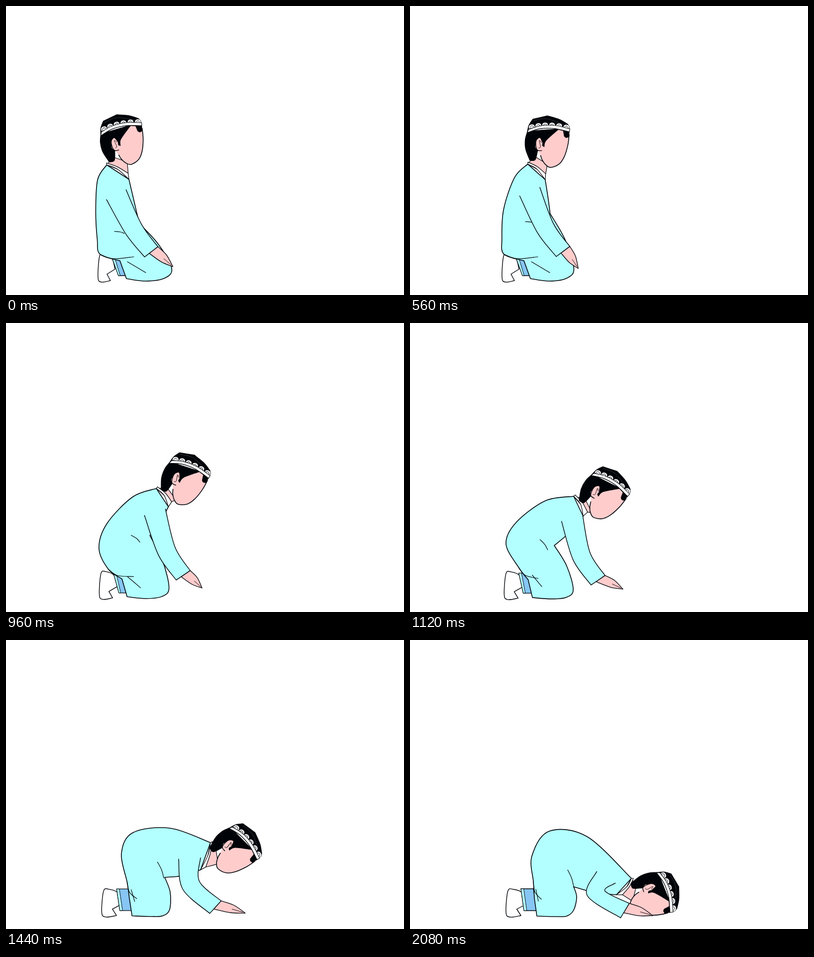
Animation of 800 by 582 pixels, one loop 3230 ms. Source, as an HTML page with a canvas:

```html
<!DOCTYPE html>
<html lang="en">
<head>
<meta charset="utf-8">
<title>Bowing down</title>
<style>
html, body { margin: 0; width: 100%; height: 100%; overflow: hidden; background: #fff; }
canvas { display: block; width: 800px; height: 582px; }
</style>
</head>
<body>
<canvas id="stage" width="800" height="582"></canvas>
<script>
const ctx = document.getElementById('stage').getContext('2d');
const LOOP = 3230, HOLD = 400, STEP = 80, LAST = 22;
const INK = '#000409', ROBE = '#b3ffff', SKIN = '#ffcccc', BLUE = '#86c5f4', WHITE = '#fff';

const pairs = a => a.flatMap((v, i) => i % 2 ? [] : [[v, a[i + 1]]]);
const add = ([x, y], dx, dy) => [x + dx, y + dy];
const mix = (a, b, u) => a.map((v, i) => v + (b[i] - v) * u);
const along = (a, b) => {
  const d = Math.hypot(b[0] - a[0], b[1] - a[1]);
  return [(b[0] - a[0]) / d, (b[1] - a[1]) / d];
};
const shift = (p, dir, d) => add(p, dir[0] * d, dir[1] * d);
const smooth = (a, b, k) => {
  const u = Math.min(1, Math.max(0, (k - a) / (b - a)));
  return u * u * (3 - 2 * u);
};

// Path of each joint through the key poses.
const keys = [0, 1, 5, 10, 14, 18, LAST];
const joints = {
  nape:     [207,320, 267,320, 329,349, 411,408, 437,444, 445,480],
  spine:    [188,350, 232,343, 272,358, 330,379, 345,381, 356,396],
  loin:     [183,415, 194,405, 213,402, 255,388, 270,387, 280,385],
  hip:      [185,470, 185,465, 193,445, 232,430, 239,435, 245,435],
  waist:    [270,438, 291,406, 290,448, 319,478, 324,485, 329,497],
  chest:    [251,349, 294,354, 348,389, 391,463, 400,489, 415,513],
  shoulder: [225,380, 260,371, 326,394, 369,440, 383,460, 394,478],
  elbow:    [259,450, 289,448, 345,470, 372,494, 373,499, 374,510],
  wrist:    [293,495, 325,496, 378,518, 421,538, 428,536, 432,545],
  tip:      [336,525, 348,532, 428,536, 481,550, 486,552, 488,555],
  ear:      [223,278, 295,283, 372,338, 446,411, 471,447, 481,497]
};
const turns = [0, 3.5, 21.5, 43.5, 62, 67, 85];

// The resting pose is the first one leaning slightly back.
const paths = Object.entries(joints).map(([name, list]) => {
  const pts = pairs(list), [x, y] = pts[0];
  return [name, [[x - 4.5 * (550 - y) / 230, y], ...pts]];
});

// Hermite blend of key values at step k.
function blend(vals, k) {
  let i = 0;
  while (i < keys.length - 2 && k >= keys[i + 1]) i++;
  const span = keys[i + 1] - keys[i], u = (k - keys[i]) / span, v = 1 - u;
  const slope = j => {
    const a = Math.max(0, j - 1), b = Math.min(keys.length - 1, j + 1);
    return (vals[b] - vals[a]) / (keys[b] - keys[a]) * span;
  };
  return vals[i] + (vals[i + 1] - vals[i]) * u * u * (3 - 2 * u)
    + slope(i) * u * v * v - slope(i + 1) * u * u * v;
}

// Smooth curve through the points; listed corners stay sharp.
function curve(pts, { fill, line = INK, width = 1.4, open = false, corners = [] } = {}) {
  const n = pts.length;
  const p = i => pts[open ? Math.min(n - 1, Math.max(0, i)) : (i + n) % n];
  const sharp = i => corners === 'all' || corners.includes(i % n);
  ctx.beginPath();
  ctx.moveTo(...p(0));
  for (let i = 0; i < (open ? n - 1 : n); i++) {
    const a = p(i), b = p(i + 1);
    const before = sharp(i) ? a : p(i - 1), after = sharp(i + 1) ? b : p(i + 2);
    ctx.bezierCurveTo(
      a[0] + (b[0] - before[0]) / 6, a[1] + (b[1] - before[1]) / 6,
      b[0] - (after[0] - a[0]) / 6, b[1] - (after[1] - a[1]) / 6, ...b);
  }
  if (fill) { ctx.fillStyle = fill; ctx.fill(); }
  if (line) { ctx.strokeStyle = line; ctx.lineWidth = width; ctx.stroke(); }
}
const shape = (list, style) => curve(pairs(list), style);

function drawCap() {
  shape([190,262, 190,246, 195,232, 222,219, 247,221, 266,227, 272,242, 240,241, 212,248],
    { fill: INK, corners: [0, 2, 3, 5, 6] });
  shape([198,234, 224,225, 266,231], { open: true, line: '#4a4f55', width: 0.6 });
  for (let i = 0; i < 6; i++) {
    const u = (i + 0.5) / 6, v = 1 - u;
    ctx.save();
    ctx.translate(v * v * 191 + 2 * u * v * 226 + u * u * 272, v * v * 252 + 2 * u * v * 233 + u * u * 235);
    ctx.rotate(0.04 - 0.5 * v);
    shape([-7,1, -5,-5, 0,-7, 5,-5, 7,1], { fill: WHITE, width: 0.8, corners: [0, 4] });
    shape([-4,-1, 0,-4, 4,-1], { open: true, width: 0.9 });
    ctx.restore();
  }
  shape([190,261, 212,248, 240,241, 272,241, 272,235, 240,235, 212,242, 191,254],
    { fill: WHITE, width: 1, corners: [0, 3, 4, 7] });
}

// Head in upright coordinates, turned about the ear.
const PIVOT = [217, 278];
function drawHead(ear, turn) {
  ctx.save();
  ctx.translate(...ear);
  ctx.rotate(turn);
  ctx.translate(-PIVOT[0], -PIVOT[1]);
  const jaw = pairs([273,246, 275,268, 273,292, 266,309, 251,319, 240,316, 231,308, 226,300]);
  curve([...jaw, [218, 290], [222, 262], [245, 240]], { fill: SKIN, line: null, corners: [0, 8] });
  curve(jaw, { open: true, width: 1.6 });
  shape([190,258, 189,275, 194,294, 207,314, 217,311, 218,292, 211,284, 216,265,
    224,279, 229,281, 230,268, 250,240], { fill: INK, corners: [0, 3, 5, 8, 9, 11] });
  shape([259,240, 264,252, 268,254, 273,252, 272,238], { fill: INK, width: 0.5, corners: [0, 1, 3, 4] });
  shape([224,273, 217,265, 211,272, 213,284, 218,291, 226,290], { fill: SKIN, open: true });
  shape([222,274, 217,271, 222,283, 219,286], { open: true, width: 0.9 });
  drawCap();
  ctx.restore();
}

function drawLeg(s, hem) {
  const foot = pairs([188,504, 197,500, 213,508, 219,530, 203,540, 210,553, 192,556, 185,547]);
  curve(foot.map(([x, y]) => [185 + (x - 185) * (1 + 0.2 * s) + 8 * s, y + 2 * s]),
    { fill: WHITE, corners: [3, 4, 5] });
  const top = [213 + 10 * s, 507 - 6 * s], low = [226 + 3 * s, 543 + 2 * s];
  const topEnd = add(top, 25, 0), lowEnd = [hem[0], low[1]];
  curve([top, topEnd, lowEnd, low], { fill: BLUE, corners: 'all' });
  curve([top, mix(top, topEnd, 0.22), mix(low, lowEnd, 0.22), low], { fill: ROBE, width: 1, corners: 'all' });
}

function drawRobe(j, s, k, hem) {
  const seat = add(hem, -53 + 46 * s, -49 - 20 * s);
  const back = add(hem, -13 + 8 * s, -36);
  const knee = [333 - 6 * Math.min(1, k / 5) + 2 * s, 528 + 16 * s];
  const thigh = add(mix(j.waist, knee, 0.5), 6, -3);
  const belly = add(mix(j.waist, j.chest, 0.5), 1, 4);
  curve([j.nape, j.spine, j.loin, j.hip, seat, back, hem, add(hem, 38, 5 - 4 * s),
    add(knee, -14, 20 - 8 * s), knee, thigh, j.waist, belly, j.chest],
    { fill: ROBE, width: 1.6, corners: [0, 5, 6, 11, 13] });

  const crease = add(j.waist, -30 * (1 - s), 20 * (1 - s));
  const folds = [
    [seat, add(mix(seat, back, 0.6), 2, 1), add(back, 28 - 14 * s, 10 * s - 8)],
    [add(back, 15 - 12 * s, 2 - 20 * s), add(back, 52 - 44 * s, 24 - 18 * s)],
    [add(crease, 8 * s - 20, -4 - 30 * s), add(crease, 4 * s - 8, -3 - 14 * s), crease]
  ];
  for (const f of folds) curve(f, { open: true, width: 1.2 });
}

function drawArm({ shoulder, elbow, wrist, tip }) {
  const upper = along(shoulder, elbow), lower = along(elbow, wrist);
  const bend = along([0, 0], add(upper, ...lower));
  const sides = (p, [x, y], w) => [shift(p, [-y, x], w), shift(p, [y, -x], w)];
  const [s0, s1] = sides(shoulder, upper, 22);
  const [e0, e1] = sides(elbow, bend, 18.5);
  const [w0, w1] = sides(wrist, lower, 17);

  // Hand tapers from the cuff to the fingertip.
  const root = mix(w0, w1, 0.35), reach = along(wrist, tip), out = [reach[1], -reach[0]];
  const top = mix(w1, tip, 0.5), low = mix(root, tip, 0.55);
  curve([w1, shift(top, out, 4), tip, shift(low, out, -3), root],
    { fill: SKIN, corners: [0, 2, 4], width: 1.3 });
  curve([mix(top, low, 0.5), mix(mix(top, low, 0.4), tip, 0.8)], { open: true, width: 1 });
  curve([s0, e0, w0, w1, e1, s1], { fill: ROBE, open: true, corners: [2, 3] });
}

function draw(k) {
  ctx.fillStyle = WHITE;
  ctx.fillRect(0, 0, 800, 582);
  ctx.lineJoin = ctx.lineCap = 'round';

  const j = Object.fromEntries(paths.map(([name, pts]) =>
    [name, [0, 1].map(axis => blend(pts.map(p => p[axis]), k))]));
  const turn = blend(turns, k) * Math.PI / 180;
  const onHead = (x, y) => {
    const dx = x - PIVOT[0], dy = y - PIVOT[1], c = Math.cos(turn), n = Math.sin(turn);
    return add(j.ear, dx * c - dy * n, dx * n + dy * c);
  };
  const s = smooth(3, 16, k);
  const hem = [242 + 13 * s * s, 549 + 7 * s];

  const mid = mix(j.nape, j.chest, 0.5), up = along(mid, j.ear);
  const throat = shift(j.chest, up, 12);
  drawLeg(s, hem);
  curve([onHead(214, 304), j.nape, throat, onHead(243, 314)], { fill: SKIN, corners: 'all', width: 1.2 });
  drawRobe(j, s, k, hem);
  curve([j.nape, shift(mid, up, 6), j.chest, throat, shift(mid, up, 11), shift(j.nape, up, 4)],
    { fill: WHITE, corners: [0, 2, 3, 5], width: 1.2 });
  drawHead(j.ear, turn);
  drawArm(j);
}

const start = performance.now();
let shown = -1;
function tick() {
  const t = (performance.now() - start) % LOOP;
  const k = t < HOLD ? 0 : Math.min(LAST, Math.floor((t - HOLD) / STEP) + 1);
  if (k !== shown) draw(shown = k);
  requestAnimationFrame(tick);
}
tick();
</script>
</body>
</html>
```
